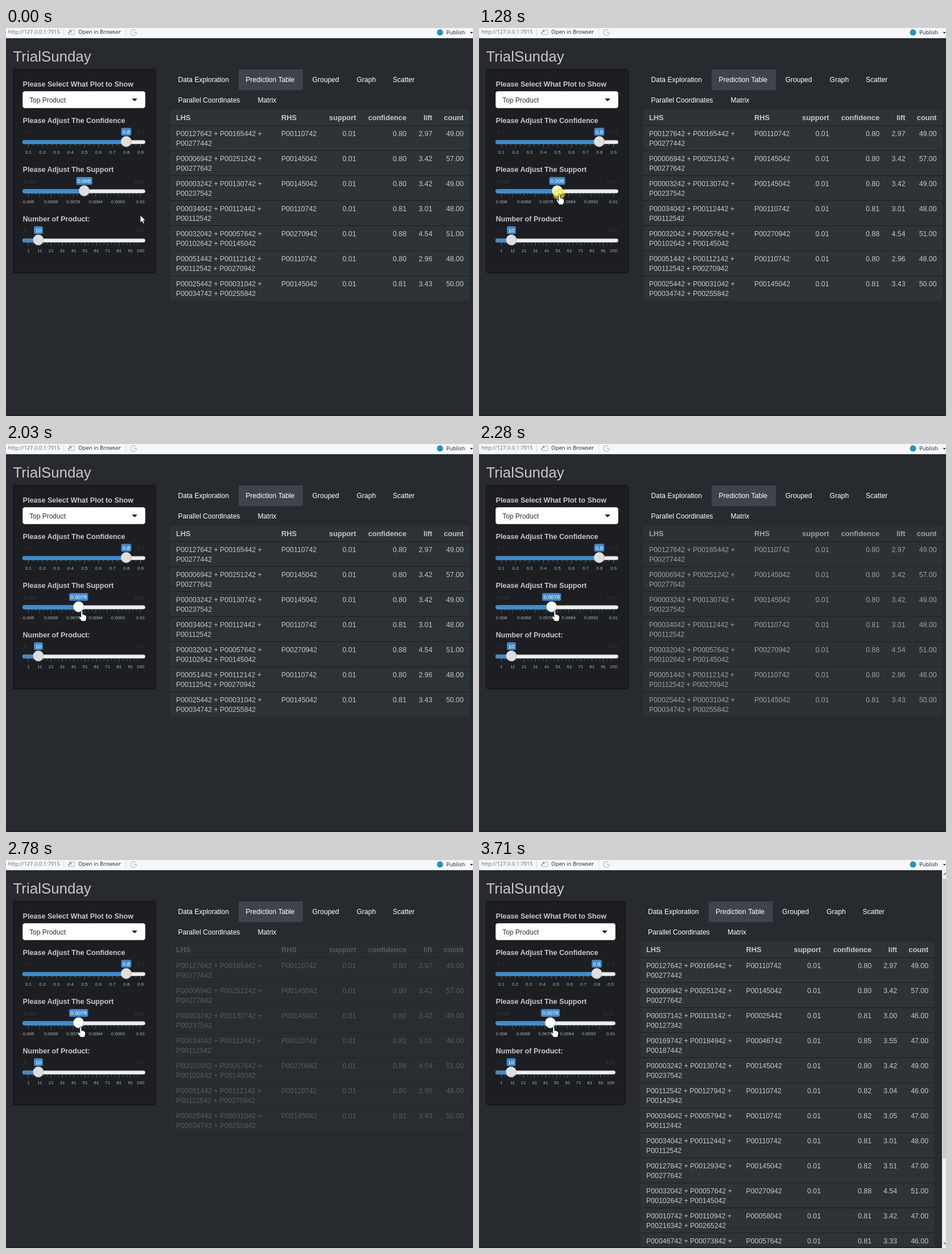
An HTML page that plays this animation: 821x682 px, repeating every 5.99 s.

```html
<!DOCTYPE html>
<html lang="en">
<head>
<meta charset="utf-8">
<title>Rules dashboard</title>
<style>
html, body { margin: 0; width: 100%; height: 100%; overflow: hidden; background: #272b30; }
svg { display: block; width: 821px; height: 682px; font-family: "Liberation Sans", Arial, sans-serif; fill: #c8c8c8; }
.bar { font: 9.65px "Open Sans", sans-serif; fill: #1c1c1c; }
.title { font-size: 25.9px; }
.label { font-size: 12.6px; font-weight: bold; }
.tab { font-size: 12.1px; fill: #fff; }
.head { font-size: 12.75px; font-weight: bold; }
.cell { font-size: 12.33px; }
.grid { font-size: 8px; fill: #b4b4b4; }
.limit { font-size: 9.2px; fill: #34373b; }
.value { font-size: 9.3px; fill: #fff; }
</style>
</head>
<body>
<svg viewBox="0 0 821 682">
  <defs>
    <linearGradient id="groove" x2="0" y2="1">
      <stop stop-color="#e6e6e6"/><stop offset="1" stop-color="#f8f8f8"/>
    </linearGradient>
  </defs>
  <rect width="821" height="682" fill="#272b30"/>
  <g id="page"></g>
  <g id="table"></g>
  <rect y="680" width="821" height="2" fill="#1f2226"/>
  <g id="scroll">
    <rect x="814" y="18" width="7" height="664" fill="#f0f0f0"/>
    <rect x="815" y="33" width="6" height="492" fill="#c9c9c9"/>
    <path d="M817 26.500L821 22.500M817 672L821 676" stroke="#555" stroke-width="1.300"/>
  </g>
  <g id="bar">
    <rect width="821" height="18" fill="#f5f8f9"/>
    <rect y="17" width="821" height="1" fill="#d9dfe2"/>
    <path d="M101.500 1V14M210.500 1V14" stroke="#d3d8da"/>
    <text class="bar" x="4" y="10" style="font-size:9.35px;fill:#666">http://127.0.0.1:7915</text>
    <path d="M113 3.500H120.500V11.500H110.500V6" fill="#fff" stroke="#a9b2b8"/>
    <path d="M109 9.500L114 5M111 4.500H114.500V8" fill="none" stroke="#6f95b5" stroke-width="1.200"/>
    <text class="bar" x="127" y="10">Open in Browser</text>
    <path d="M228 4A5.300 5.300 0 1 0 229.500 8H225V5.500" fill="none" stroke="#c3c7ca" stroke-width="1.500"/>
    <circle cx="763" cy="7.800" r="5.500" fill="#2c8cc4"/>
    <text class="bar" x="774" y="11">Publish</text>
    <path d="M815.500 7H821L818.300 10Z" fill="#333"/>
  </g>
  <circle id="press" r="10.500" fill="#efe52a" fill-opacity=".65"/>
  <path id="arrow" d="M0 0V13L3 10.300L5.200 15L7.500 14L5.400 9.500H9.500Z" fill="#fff" stroke="#111" stroke-width=".8"/>
  <path id="hand" d="M-.7 1.500Q.8 -1 2.300 1.500V7Q4.600 6.300 4.800 8Q7 7.200 7.200 9Q9 8.700 9 10.500V14L7.500 19H.5L-4 12.500Q-5 9.800 -2.500 10.200L-.7 12Z" fill="#fff" stroke="#111" stroke-width=".8"/>
</svg>
<script>
const LOOP = 5990;
const $ = id => document.getElementById(id);
const text = (cls, x, y, s, anchor = 'start') =>
  `<text class="${cls}" x="${x}" y="${Math.round(y)}" text-anchor="${anchor}">${s}</text>`;
const rect = (x, y, w, h, fill, more = '') =>
  `<rect x="${x}" y="${y}" width="${w}" height="${h}" fill="${fill}" ${more}/>`;

// Item codes, then result, confidence, lift and count
const RULES = {
  A: '1276 1654 2774|1107|0.80|2.97|49', B: '0069 2512 2776|1450|0.80|3.42|57',
  C: '0032 1307 2375|1450|0.80|3.42|49', D: '0340 1124 1125|1107|0.81|3.01|48',
  E: '0320 0576 1026 1450|2709|0.88|4.54|51', F: '0514 1121 1125 2709|1107|0.80|2.96|48',
  G: '0254 0310 0347 2558|1450|0.81|3.43|50', H: '0371 1131 1273|0254|0.81|3.00|46',
  I: '1697 1849 1874|0467|0.85|3.55|47', J: '1125 1279 1429|1107|0.82|3.04|46',
  K: '0340 0579 1124|1107|0.82|3.05|47', L: '1278 1293 2776|1450|0.82|3.51|47',
  M: '0107 1109 2163 2652|0580|0.81|3.42|47', N: '0467 0738|0576|0.81|3.33|46'
};
const HEADS = ['LHS', 'RHS', 'support', 'confidence', 'lift', 'count'];
const item = code => `P00${code}42`;

function drawTable(rules, left, right, cols) {
  const cell = (i, cls, y, s) => text(cls, cols[i], y, s, i < 2 ? 'start' : 'end');
  let out = rect(left, 144, right - left, 27.5 + rules.length * 44, '#2e3338');
  HEADS.forEach((s, i) => out += cell(i, 'head', 162, s));
  [...rules].forEach((key, n) => {
    const y = 171 + n * 44;
    const [lhs, rhs, conf, lift, count] = RULES[key].split('|');
    const ids = lhs.split(' ').map(item);
    out += rect(left, y, right - left, 1, '#1c1e22');
    out += cell(0, 'cell', y + 19, ids.slice(0, 2).join(' + ') + ' +');
    out += cell(0, 'cell', y + 36, ids.slice(2).join(' + '));
    [item(rhs), '0.01', conf, lift, count + '.00']
      .forEach((s, i) => out += cell(i + 1, 'cell', y + 19, s));
  });
  return out;
}

function drawSlider(dy, end, o) {
  const start = 39.5, span = end - 8.5 - start;
  const knob = start - 0.5 + span * o.pos;
  const w = o.value.length > 2 ? o.value.length * 5.17 - 2.6 + 4.8 : 15.8;
  let out = text('label', 29.5, 166.5 + dy, o.label);
  out += text('limit', 31.5, 186 + dy, o.min) + text('limit', end - 2, 186 + dy, o.max, 'end');
  for (let k = 0; k <= o.bigs * 3 + 1e-6; k++) {
    const x = start + span * k / (o.bigs * 3);
    out += rect(x - 0.5, 204 + dy, 1, k % 3 ? 3.2 : 6, '#35699a');
  }
  o.ticks.forEach((s, i) =>
    out += text('grid', start + span * Math.min(1, i / o.parts), 221 + dy, s, 'middle'));
  out += rect(29.4, 197.4 + dy, end - 29.8, 6.2, 'url(#groove)', 'rx="3" stroke="#ccc" stroke-width=".8"');
  out += rect(29, 197 + dy, knob - 29, 7, '#428bca', 'rx="3"');
  out += `<circle cx="${knob}" cy="${199.5 + dy}" r="9.2" fill="${o.hot ? '#fff' : '#dedede'}" stroke="#bbb" stroke-width=".8"/>`;
  out += rect(knob - w / 2, 175.5 + dy, w, 13.5, '#428bca', 'rx="2.5"');
  return out + text('value', knob, 185.8 + dy, o.value, 'middle');
}

function drawPage(narrow, low, hot) {
  const shift = narrow ? -5.5 : 0, end = narrow ? 240 : 245;
  const tenths = Array.from({ length: 9 }, (_, i) => `0.${i + 1}`);
  const tens = Array.from({ length: 11 }, (_, i) => Math.min(100, 1 + i * 10));
  let out = text('title', 12.5, 58.5, 'TrialSunday');
  out += rect(12.5, 72.5, 250 + shift, 358, '#1c1e22', 'rx="3.5" stroke="#0c0d0e"');
  out += text('label', 29.5, 103, 'Please Select What Plot to Show');
  out += rect(29.5, 111.5, end - 30, 29, '#fff', 'rx="3.5" stroke="#ccc"');
  out += '<text x="41" y="131" font-size="12" fill="#333">Top Product</text>';
  out += `<path d="M${end - 24} 124h10l-5 5z" fill="#222"/>`;
  out += drawSlider(0, end, { label: 'Please Adjust The Confidence', min: '0.1', max: '0.9',
    value: '0.8', pos: 0.875, ticks: tenths, parts: 8, bigs: 8 });
  out += drawSlider(86.5, end, { label: 'Please Adjust The Support', min: '0.006', max: '0.01',
    value: low ? '0.0078' : '0.008', pos: low ? 0.45 : 0.5, hot,
    ticks: ['0.006', '0.0068', '0.0076', '0.0084', '0.0092', '0.01'], parts: 5, bigs: 10 });
  out += drawSlider(173, end, { label: 'Number of Product:', min: '1', max: '100',
    value: '10', pos: 1 / 11, ticks: tens, parts: 9.9, bigs: 9.9 });
  out += rect(409 + shift, 73, 113, 36, '#3e444c');
  const tab = (x, y, s) => out += text('tab', x + shift, y, s);
  tab(302.5, 95, 'Data Exploration');
  tab(421.5, 95, 'Prediction Table');
  tab(538.5, 95, 'Grouped');
  tab(616.5, 95, 'Graph');
  tab(680, 95, 'Scatter');
  tab(302.5, 131, 'Parallel Coordinates');
  tab(442.5, 131, 'Matrix');
  return out;
}

// Progress in n equal jumps, the first at a and the last at b
function steps(t, a, b, n) {
  const k = Math.floor((t - a) / (b - a) * (n - 1) + 1e-6) + 1;
  return Math.max(0, Math.min(n, k)) / n;
}
const ease = p => 0.5 * p + 0.5 * p * p * (3 - 2 * p);

function fade(t) {
  if (t < 1780 || t >= 3580) return 1;
  if (t < 2280) return 0.98;
  if (t < 2350) return 0.75;
  if (t < 2490) return 0.45;
  return t < 2600 ? 0.36 : 0.3;
}

let shown = '';
function draw(t) {
  const narrow = t >= 3580, low = t >= 1450, hot = t >= 930;
  const key = [narrow, low, hot].join();
  if (key !== shown) {
    shown = key;
    $('page').innerHTML = drawPage(narrow, low, hot);
    $('table').innerHTML = narrow
      ? drawTable('ABHICJKDLEMN', 283.5, 800, [294, 469.5, 601, 690, 735, 790])
      : drawTable('ABCDEFG', 289, 815, [299, 484, 615.5, 704, 749.5, 804.5]);
    $('scroll').style.display = narrow ? '' : 'none';
  }
  $('table').setAttribute('opacity', fade(t));

  const go = ease(steps(t, 240, 780, 10));
  const near = steps(t, 850, 1100, 4);
  const drag = steps(t, 1350, 1600, 5);
  const x = 236 - 92 * go - 3.5 * near - 8 * drag - (t >= 2490) - (t >= 2780);
  const y = 329 - 34 * go - 3.5 * near + drag;
  for (const [id, on] of [['arrow', !hot], ['hand', hot], ['press', t >= 1280 && t < 2030]]) {
    $(id).style.display = on ? '' : 'none';
    $(id).setAttribute('transform', `translate(${x} ${y})`);
  }
}

const began = performance.now();
function tick() {
  draw((performance.now() - began) % LOOP);
  requestAnimationFrame(tick);
}
tick();
</script>
</body>
</html>
```
